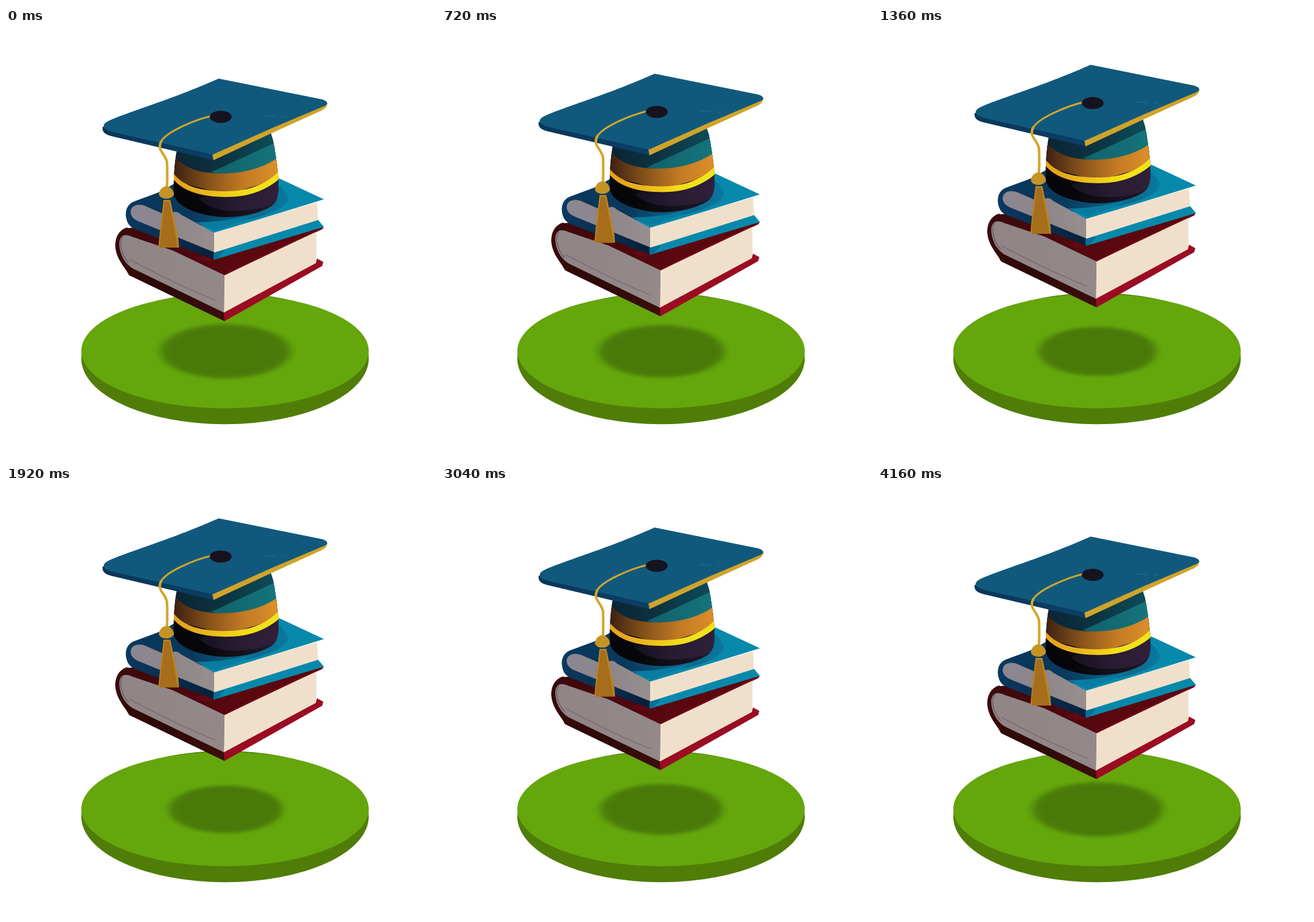
These frames come from a looping animation (748x748 px, 4.24 s). An HTML page with a canvas:

```html
<!DOCTYPE html>
<html lang="en">
<head>
<meta charset="utf-8">
<title>Floating books and cap</title>
<style>
html, body { margin: 0; width: 100%; height: 100%; overflow: hidden; background: #fff; }
canvas { display: block; width: 748px; height: 748px; filter: blur(.5px); }
</style>
</head>
<body>
<canvas id="stage" width="748" height="748"></canvas>
<script>
const ctx = document.getElementById('stage').getContext('2d');
const LOOP = 4240, STEP = 80, PEAK = 2030, HALF = 2000, LIFT = 32;

function fill(d, color) {
  ctx.fillStyle = color;
  ctx.fill(new Path2D(d));
}

function line(d, color, width) {
  ctx.strokeStyle = color;
  ctx.lineWidth = width;
  ctx.stroke(new Path2D(d));
}

function oval(x, y, rx, ry, color) {
  ctx.fillStyle = color;
  ctx.beginPath();
  ctx.ellipse(x, y, rx, ry, 0, 0, Math.PI * 2);
  ctx.fill();
}

function blend(x0, y0, x1, y1, ...colors) {
  const g = ctx.createLinearGradient(x0, y0, x1, y1);
  colors.forEach((c, i) => g.addColorStop(i / (colors.length - 1), c));
  return g;
}

function drawGround(rise) {
  oval(381, 575, 250, 114.3, '#507d08');
  oval(381, 562, 250, 99.5, '#64a60c');

  const k = 1 - 0.125 * rise;
  ctx.save();
  ctx.translate(382, 562.5);
  ctx.scale(125 * k, 52 * k);
  const g = ctx.createRadialGradient(0, 0, 0.76, 0, 0, 1);
  g.addColorStop(0, 'rgba(73,122,9,1)');
  g.addColorStop(0.35, 'rgba(73,122,9,.85)');
  g.addColorStop(0.7, 'rgba(73,122,9,.3)');
  g.addColorStop(1, 'rgba(73,122,9,0)');
  oval(0, 0, 1, 1, g);
  ctx.restore();
}

function drawRedBook() {
  fill('M210 347 C196 352 190 364 190 379 C191 397 201 410 210 423 L214 430 L380 510 L381 428 L300 380 Z',
    blend(190, 370, 380, 500, '#3b0a0b', '#2d0909', '#3d0d0d'));
  fill('M205 349 L240 345 L362 390 L553 346 L550 350 L380 431 L225 364 Q208 354 200 360 Z',
    blend(210, 350, 400, 400, '#3c0a0c', '#4a080e', '#5a0710'));
  fill('M330 400 Q350 392 368 390 L362 404 L345 407 Z', '#620812');
  fill('M380 430 L379 495 L222 419 C207 411 197 393 197 374 C198 361 206 357 219 363 L290 387 Z',
    blend(200, 0, 380, 0, '#908486', '#938988'));
  line('M203 363 C195 374 201 394 213 408', '#685b60', 1.5);
  line('M215 403 L270 431 Q318 455 363 473', '#7b6e73', 1.8);
  fill('M380 430 L540 354 L540 411 L379 496 Z', '#f0e0cb');
  fill('M379 495 L539 409 L541 401 L552 407 L550 414 L380 510 Z', '#9b0c23');
  line('M381 429 L460 390 L550 349', '#7d0b1a', 1.5);
}

function drawBlueBook() {
  fill('M268 285 L222 302 C210 307 207 319 209 330 C211 340 215 346 225 350 L362 403 L362 355 L300 322 Z',
    blend(208, 300, 362, 400, '#0a3b61', '#0b2f52', '#061f38'));
  fill('M268 285 L340 268 L476 262 L553 298 L362 357 L303 328 L237 300 Z', '#0789ac');
  fill('M268 285 L320 255 L470 270 Q495 290 489 303 Q472 322 425 332 L355 345 L334 342 L303 328 L235 300 Z',
    blend(240, 0, 490, 0, '#07375b', '#09395d', '#0b6187', '#0a789d'));
  fill('M330 338 Q380 338 440 323 L365 353 Z', '#077ca0');
  fill('M362 356 L362 390 L232 337 C221 333 216 326 217 318 C219 308 231 305 243 310 L280 326 L290 321 Q297 317 305 325 Z',
    blend(217, 0, 362, 0, '#8b8793', '#8e8589', '#978e8e'));
  fill('M362 356 L541 303 L543 335 L362 391 Z', '#f0e0cb');
  fill('M361 391 L543 334 L553 346 L362 403 Z', '#0789ac');
  fill('M361 391 L381 386 L368 401 L361 403 Z', '#066f96');
}

function drawDome() {
  const dome = new Path2D('M297 214 C293 235 291 265 292 288 C294 309 327 323 365 328 C405 332 444 322 463 309 C475 299 474 283 474 264 C473 245 469 222 467 208 Q465 194 460 181 L360 190 Z');
  ctx.save();
  ctx.clip(dome);
  ctx.fillStyle = blend(292, 0, 474, 0, '#050508', '#08080c', '#17111c', '#241a2c');
  ctx.fillRect(285, 170, 195, 165);
  fill('M335 296 Q350 315 392 318 Q440 319 470 303 L480 294 L480 255 L400 285 Z',
    blend(336, 0, 474, 0, '#151120', '#281c32', '#30203a'));
  fill('M285 170 H480 V235 L440 260 L360 262 L285 235 Z',
    blend(300, 215, 460, 205, '#0b2635', '#0c3442', '#0d4a57'));
  fill('M356 251 Q420 222 473 197 L480 240 L400 260 Z',
    blend(356, 0, 470, 0, '#11616a', '#15747b'));

  fill('M290 220 C310 244 335 253 375 253 C415 253 450 243 476 223 V262 L383 290 L288 265 Z',
    blend(293, 0, 472, 0, '#3e2112', '#86521a', '#c27a24', '#dc8e29'));
  fill('M288 248 C305 276 340 284 383 284 C420 284 452 274 478 246 V260 C452 284 420 294 383 294 C340 294 305 284 288 259 Z',
    blend(292, 0, 474, 0, '#e5a31c', '#e6a81d', '#eab91c', '#efcb1a', '#f2dd18', '#f2e21a', '#f2e21a'));
  ctx.restore();
}

function drawBoard() {
  fill('M168 172 C167 181 172 185 183 188 L361 230 L366 214 L190 170 Z',
    blend(168, 180, 361, 225, '#0a3659', '#0b3f64'));
  fill('M559 131 Q559 138 550 143 L462 183 L361 230 L359 220 L540 125 Z', '#d0a32a');
  fill('M370 88 L549 124 Q558 126 559 131 Q558 134 553 136 L463 174 L360 220 L186 181 C171 177 164 170 176 163 C205 148 282 127 370 88 Z',
    '#11597c');
  line('M449 153 Q458 153 468 154 M479 155 L487 154', '#2b6c8c', 1);
}

function drawTassel() {
  line('M357 153 C328 160 280 180 270 197', '#d2a62c', 3.2);
  line('M270 197 C262 213 276 217 280 233 Q281 252 280 277', '#d2a62c', 4.4);
  oval(373.5, 154.5, 19, 10.5, '#15131f');
  fill('M279 275 C287 276 293 285 292 290 Q288 297 279 297 Q269 297 266 290 C266 283 271 276 279 275 Z', '#c69425');
  fill('M274 299 H286 L300 368 L301 382 H265 L267 360 Z', '#b98422');
  fill('M276 302 H284 L297 372 L298 382 H267 L269 360 Z', '#a66d1b');
}

function draw(t) {
  const away = Math.min(1, Math.abs(t - PEAK) / HALF);
  const rise = (1 + Math.cos(Math.PI * away)) / 2;
  ctx.fillStyle = '#fff';
  ctx.fillRect(0, 0, 748, 748);
  drawGround(rise);
  ctx.save();
  ctx.translate(0, -LIFT * rise);
  drawRedBook();
  drawBlueBook();
  drawDome();
  drawBoard();
  drawTassel();
  ctx.restore();
}

ctx.lineCap = 'round';
const start = performance.now();
function tick() {
  const t = (performance.now() - start) % LOOP;
  draw(Math.floor(t / STEP) * STEP);
  requestAnimationFrame(tick);
}
tick();
</script>
</body>
</html>
```
